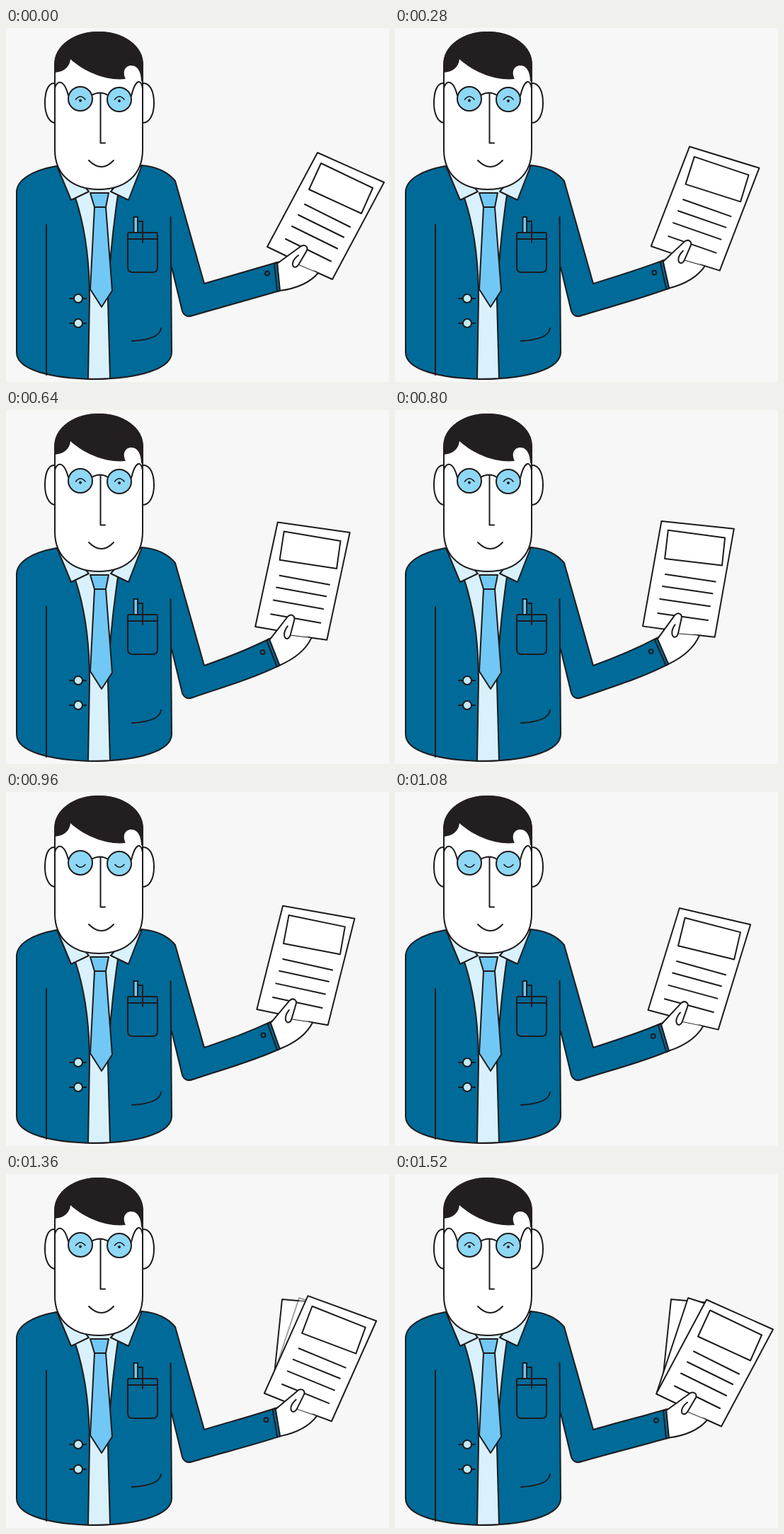
Animation, 541 px wide and 500 px high, one loop 2410 ms. Source, as an HTML page:

```html
<!DOCTYPE html>
<html lang="en">
<head>
<meta charset="utf-8">
<title>Handing over documents</title>
<style>
  html, body { margin: 0; width: 100%; height: 100%; overflow: hidden; background: #f7f7f7; }
  svg { display: block; width: 541px; height: 500px; }
  .ink { fill: none; stroke: #1d1b1d; stroke-width: 2; stroke-linecap: round; stroke-linejoin: round; }
  .white { fill: #fff; }
  .suit { fill: #006a98; }
  .shirt { fill: #d9f1fd; }
  .tie { fill: #72c8f4; }
  .lens { fill: #8ed8f5; }
  .button { fill: #c3e9f3; }
  .hair { fill: #231f20; }
  .bare { stroke: none; }
  .thin { stroke-width: 1; }
  .eye { stroke-width: 1.6; }
</style>
</head>
<body>
<svg viewBox="0 0 541 500">
  <g class="ink">
    <!-- jacket and arm -->
    <path class="suit bare" d="M71 195C38 201 15 214 15 232V458C15 483 63 495 125 496C190 495 234 481 234 458V213L192 194Z"/>
    <path id="arm" class="suit"/>
    <path d="M71 195C38 201 15 214 15 232V458C15 483 63 495 125 496C190 495 234 481 234 458L232.500 267M57 278V490"/>

    <!-- shirt, tie, collar -->
    <path class="shirt bare" d="M98 240L110 212H155L158 236L140 260H110Z"/>
    <path class="shirt" d="M98 240C112 282 118 330 118 382L116 495.500Q132 496 147 495L144 385C146 330 150 290 158 236"/>
    <path class="tie" d="M125 253H141L150 371L135 394L119 369Z"/>
    <path class="tie" d="M119 233H145L141 253H125Z"/>
    <path class="shirt" d="M72 195L92 243L117 231L95 205ZM192 194L173 243L148 231L170 205Z"/>

    <!-- pockets and buttons -->
    <path class="tie" d="M180.500 288V267H186V288"/>
    <path d="M172 291Q172 289 174 289H212Q214 289 214 291V338Q214 345 207 345H179Q172 345 172 338ZM172 298H214M186 273H193V303M178 442Q217 440 219 424"/>
    <path d="M90 382H113M90 417H113"/>
    <circle class="button" cx="102" cy="382" r="6"/>
    <circle class="button" cx="102" cy="417" r="6"/>

    <!-- head -->
    <path class="white" d="M69 78C59 77 55 91 55 106C55 122 61 134 70 134ZM193 78C204 77 209 91 209 106C209 122 203 134 193 134Z"/>
    <path class="white" d="M69 62V172C69 208 95 228 131 228C168 228 193 208 193 172V52C193 25 165 6 131 6C97 6 69 25 69 52Z"/>
    <path class="hair bare" d="M68.500 63V52C68.500 24 97 5 131 5C166 5 194 25 194 54V77L191 75C191 64 187 53 177 53C168 53 164 62 169 72C143 75 112 63 91 44C90 55 82 62 68.500 63Z"/>
    <path d="M69 85C72 73 82 72 88 95M193 85C191 72 183 71 177 96"/>
    <path d="M121 95Q133 88 144 95M133.500 92V162.500H140M117 187Q135 205 152 187"/>
    <circle class="lens" cx="105" cy="100" r="17"/>
    <circle class="lens" cx="160" cy="101" r="17"/>
    <g id="open" class="eye">
      <path d="M98.500 101Q105 92.500 112 101M153.500 101Q160 92.500 167 101"/>
      <circle class="hair bare" cx="105" cy="102.500" r="2"/>
      <circle class="hair bare" cx="160" cy="103" r="2"/>
    </g>
    <path id="shut" class="eye" d="M99 102.500Q105 110 112 102.500M154 102.500Q160 110 167 102.500"/>

    <!-- sheets left fanned out behind -->
    <path id="sheetA" class="white" d="M390 177L440 181.500L425 296L378.500 288Z"/>
    <path id="sheetB" class="white" d="M414 175L465 191.500L420 320L370 308Z"/>

    <!-- cuff, hand and front sheet -->
    <g id="hand">
      <path class="white" d="M384 331L412 322L441 346C428 361 410 368 387 371Z"/>
      <path class="white bare" d="M440 176L534 218L461 355L369 309Z"/>
      <path d="M398 323L369 309L440 176L534 218L461 355L441 346"/>
      <path class="thin" d="M410 333L441 346"/>
      <path d="M445 191L518 226L502 262L428 228Z"/>
      <path d="M422 249L486 281M413 264L477 295.500M404 280L468 311.500M395 298L459 329.500"/>
      <path class="white bare" d="M384 332L417 308C423 305 428 310 424 316L417 329C413 339 405 341 405 334L412 334L405 352L387 370Z"/>
      <path d="M384 332L417 308C423 305 428 310 424 316L414 333C410 340 404 339 405 332C406 327 409 324 413 321"/>
      <path class="suit" d="M379 333L383 331L387 371L383 372Z"/>
      <circle cx="369" cy="346.500" r="3"/>
    </g>
  </g>
</svg>
<script>
const $ = id => document.getElementById(id);
const LOOP = 2410, STEP = 40, LAST = 38, TURN = 19;
const PIVOT = [347, 367];
const clamp = v => Math.min(1, Math.max(0, v));

// Swing one degree per step towards the body, then back out, settling a little lower.
function swing(s) {
  const angle = Math.abs(s - TURN) - TURN;
  const sag = 1.6 * Math.sin(Math.PI * -angle / TURN);
  return { angle, dy: sag + 1.5 * clamp((s - TURN) / TURN) };
}

function spin(x, y, angle) {
  const a = angle * Math.PI / 180, c = Math.cos(a), n = Math.sin(a);
  return [x * c - y * n, x * n + y * c];
}

// Sleeve edge that bends from a fixed elbow point to the moving cuff.
function edge(from, rest, { angle, dy }) {
  const [u, v] = spin(rest[0] - PIVOT[0], rest[1] - PIVOT[1], angle);
  const to = [PIVOT[0] + u, PIVOT[1] + v + dy];
  const dx = (rest[0] - from[0]) / 3, dy3 = (rest[1] - from[1]) / 3;
  const a = spin(dx, dy3, angle * 0.2), b = spin(dx, dy3, angle * 0.65);
  return {
    from, to,
    near: [from[0] + a[0], from[1] + a[1]],
    far: [to[0] - b[0], to[1] - b[1]]
  };
}

function draw(time) {
  const t = time % LOOP;
  const s = Math.min(LAST, Math.floor(t / STEP));
  const pose = swing(s);
  const top = edge([280, 361], [383, 331], pose);
  const low = edge([264, 406], [387, 371], pose);

  $('arm').setAttribute('d',
    `M192 194C215 196 230 205 239 216L280 361C${top.near} ${top.far} ${top.to}` +
    `L${low.to}C${low.far} ${low.near} ${low.from}Q253 410 249 400L234 338`);
  $('hand').setAttribute('transform',
    `translate(0 ${pose.dy}) rotate(${pose.angle} ${PIVOT})`);

  $('sheetA').setAttribute('opacity', clamp((s - 28) / 6));
  $('sheetB').setAttribute('opacity', clamp((s - 32) / 5));

  const blink = t >= 880 && t < 1200;
  $('open').setAttribute('visibility', blink ? 'hidden' : 'visible');
  $('shut').setAttribute('visibility', blink ? 'visible' : 'hidden');
}

const start = performance.now();
function tick() {
  draw(performance.now() - start);
  requestAnimationFrame(tick);
}
tick();
</script>
</body>
</html>
```
